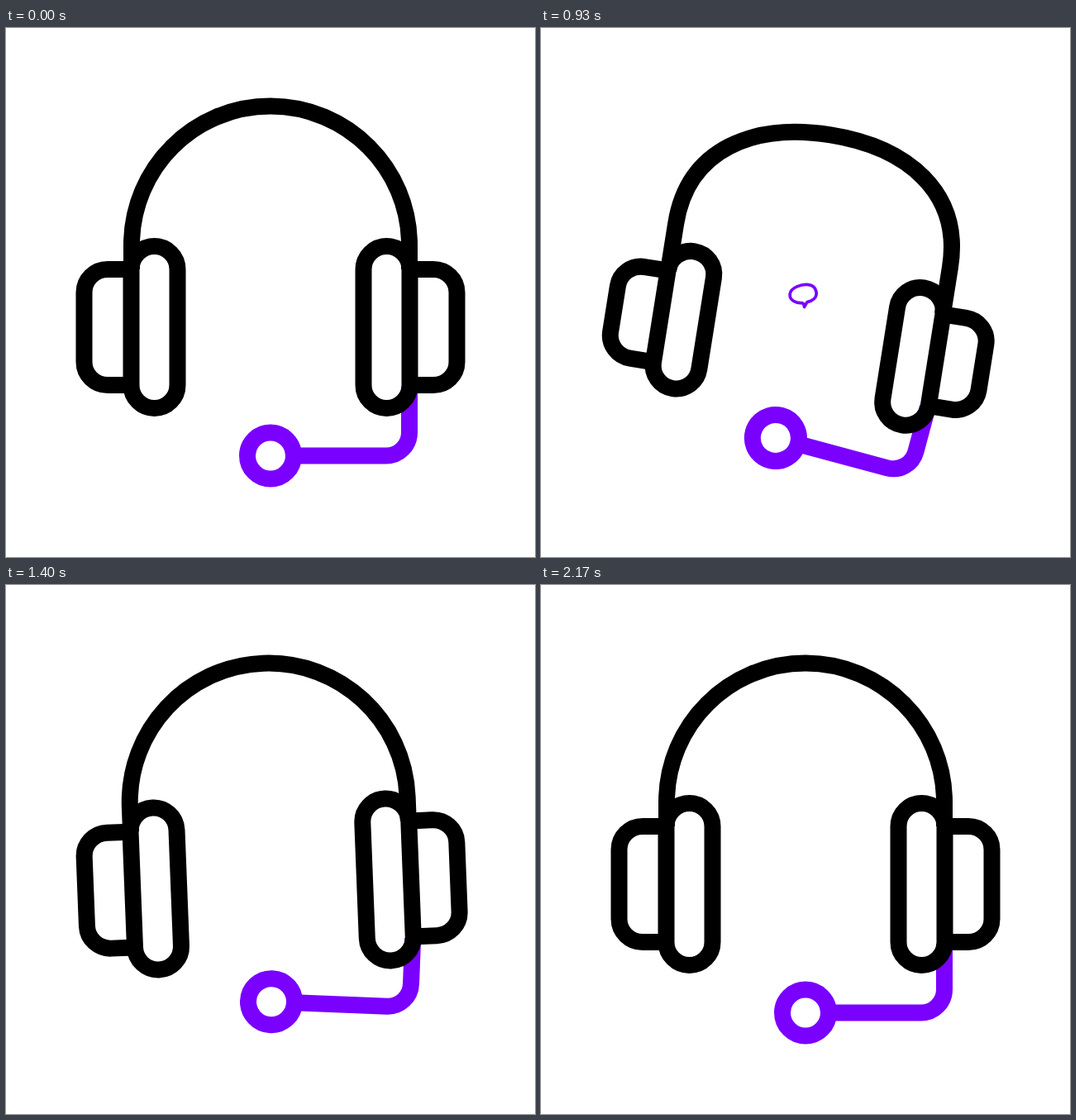
An HTML page for the animation above (2500 ms loop, 640x640 px).

```html
<!DOCTYPE html>
<html lang="en">
<head>
<meta charset="utf-8">
<title>Headset</title>
<style>
  html, body { margin: 0; width: 100%; height: 100%; overflow: hidden; background: #fff; }
  svg { display: block; width: 100vw; height: 100vh; }
  .line { fill: none; stroke: #000; stroke-width: 20; stroke-linejoin: round; }
  .accent { stroke: #7a00ff; }
</style>
</head>
<body>
<svg viewBox="0 0 640 640">
  <defs>
    <path id="bubble" transform="rotate(-1.9 320 320)" d="M231 333C231 291 299 258 345 258C368 258 383 267 391 279S404 303 404 315C404 341 382 361 350 373L335 407L334 401C331 389 325 383 314 383C306 383 300 385 285 384C253 381 231 362 231 333Z"/>
  </defs>
  <g id="head">
    <g id="mic" class="line accent">
      <circle cx="320" cy="517.5" r="28"/>
      <path d="M348 517.5H460A28 28 0 0 0 488 489.5V434"/>
    </g>
    <g class="line">
      <path id="band"/>
      <path id="cups"/>
      <rect class="pad" x="151.5" width="56" rx="28"/>
      <rect class="pad" x="432.5" width="56" rx="28"/>
    </g>
    <use id="ask" class="line accent" href="#bubble"/>
    <use id="reply" class="line" href="#bubble"/>
  </g>
</svg>
<script>
const LOOP = 2500, STEP = 1000 / 30;
const $ = id => document.getElementById(id);
const pads = document.querySelectorAll('.pad');

// Smooth rise from 0 to 1 between two times.
function ease(t, from, to) {
  const u = Math.min(1, Math.max(0, (t - from) / (to - from)));
  return (1 - Math.cos(Math.PI * u)) / 2;
}

const tilt = t => 10 * ease(t, 667, 1000) - 13 * ease(t, 1000, 1333) + 3 * ease(t, 1333, 1533);
const squash = t => ease(t, 467, 850) - ease(t, 1000, 1333);
const popSize = (t, start) => ease(t, start, start + 150) - ease(t, start + 270, start + 400);

// Rise, four equal swings to and fro, then rest.
function swing(t) {
  let angle = 6 * ease(t, 467, 800) - 6 * ease(t, 1967, 2167);
  for (let i = 0; i < 4; i++) {
    const start = 967 + 250 * i;
    angle += (i % 2 ? 9 : -9) * ease(t, start, start + 250);
  }
  return angle;
}

function pop(el, size, flip, dy) {
  el.style.display = size > 0.01 ? '' : 'none';
  el.setAttribute('transform',
    `translate(317.5 ${322 + dy}) scale(${size * flip} ${size}) translate(-317.5 -322)`);
}

function cup(x, dir, drop) {
  const sweep = dir > 0 ? 1 : 0, bend = x + 28 * dir, edge = x + 56.5 * dir;
  return `M${x} ${292 + drop}H${bend}A28.5 28 0 0 ${sweep} ${edge} ${320 + drop}` +
    `V404A28.5 28 0 0 ${sweep} ${bend} 432H${x}`;
}

function draw(time) {
  const t = Math.floor((time + 4) / STEP) * STEP;
  const press = squash(t), drop = 28 * press, top = 94.5 + 32.5 * press;

  $('head').setAttribute('transform', `rotate(${tilt(t)} 320 320)`);
  $('mic').setAttribute('transform', `rotate(${swing(t)} 488 432)`);
  // The side handles keep their length, so the pressed band grows fuller shoulders.
  $('band').setAttribute('d', `M152 ${292 + drop}V262.5C152 169.7 227.2 ${top} 320 ${top}` +
    `S488 169.7 488 262.5V${292 + drop}`);
  $('cups').setAttribute('d', cup(151, -1, drop) + cup(489, 1, drop));
  for (const pad of pads) {
    pad.setAttribute('y', 264 + drop);
    pad.setAttribute('height', 196 - drop);
  }
  pop($('ask'), popSize(t, 570), 1, 0);
  pop($('reply'), popSize(t, 950), -1, 9);
}

const start = performance.now();
function tick() {
  draw((performance.now() - start) % LOOP);
  requestAnimationFrame(tick);
}
tick();
</script>
</body>
</html>
```
